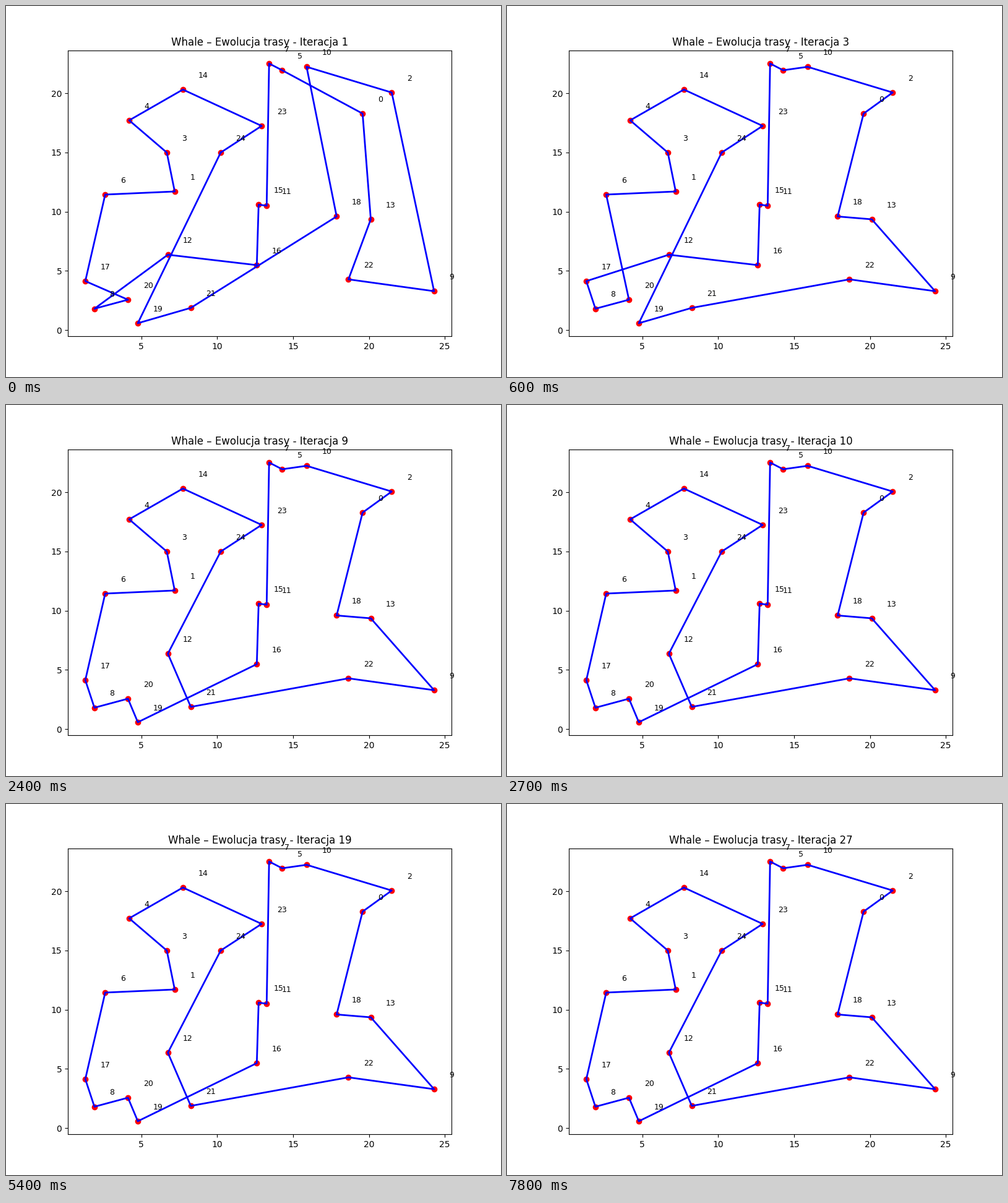
Write a matplotlib script that moves like this. It is 800 px wide and 600 px high and loops after 8 s.

```python
from itertools import combinations
import math

import matplotlib.pyplot as plt
from matplotlib.animation import FuncAnimation

LOOP_MS = 8000
INTERVAL = 100
ITERATION_MS = 300

# City number: position, listed in visiting order
cities = {
    24: (10.23, 15.00), 23: (12.93, 17.25), 14: (7.74, 20.32), 4: (4.20, 17.72),
    3: (6.68, 15.00), 1: (7.20, 11.71), 6: (2.62, 11.45), 20: (4.12, 2.57),
    8: (1.91, 1.81), 17: (1.31, 4.14), 12: (6.75, 6.37), 16: (12.61, 5.49),
    15: (12.73, 10.60), 11: (13.26, 10.51), 7: (13.42, 22.52), 5: (14.28, 21.95),
    10: (15.89, 22.24), 2: (21.50, 20.07), 0: (19.58, 18.29), 18: (17.87, 9.60),
    13: (20.12, 9.36), 9: (24.29, 3.29), 22: (18.65, 4.29), 21: (8.26, 1.88),
    19: (4.77, 0.585),
}


def closed_path(route):
    return [cities[c] for c in route + route[:1]]


def length(route):
    points = closed_path(route)
    return sum(map(math.dist, points, points[1:]))


def swapped(route, i, j):
    result = route.copy()
    result[i], result[j] = route[j], route[i]
    return result


def best_swap(route):
    """The shortest route reachable by exchanging two cities."""
    pairs = combinations(range(len(route)), 2)
    return min((swapped(route, i, j) for i, j in pairs), key=length)


tour = list(cities)
tangled = tour[:7] + [17, 20, 8] + tour[10:16] + [0, 13, 22, 9, 2, 10, 18] + tour[23:]
untwisted = best_swap(tour)

# First iteration of each best route
routes = {1: tangled, 2: tour, 4: untwisted, 9: best_swap(untwisted)}

fig, ax = plt.subplots(figsize=(8, 6), dpi=100)
ax.scatter(*zip(*cities.values()), color="red")
for number, (x, y) in cities.items():
    ax.text(x + 1, y + 1, str(number), fontsize=9)
path, = ax.plot([], [], color="blue", linewidth=2)
title = ax.set_title("")


def update(frame):
    iteration = frame * INTERVAL // ITERATION_MS + 1
    route = routes[max(start for start in routes if start <= iteration)]
    path.set_data(*zip(*closed_path(route)))
    title.set_text(f"Whale – Ewolucja trasy - Iteracja {iteration}")
    return path, title


anim = FuncAnimation(fig, update, frames=LOOP_MS // INTERVAL, interval=INTERVAL,
                     repeat=True, repeat_delay=0)
plt.show()
```
